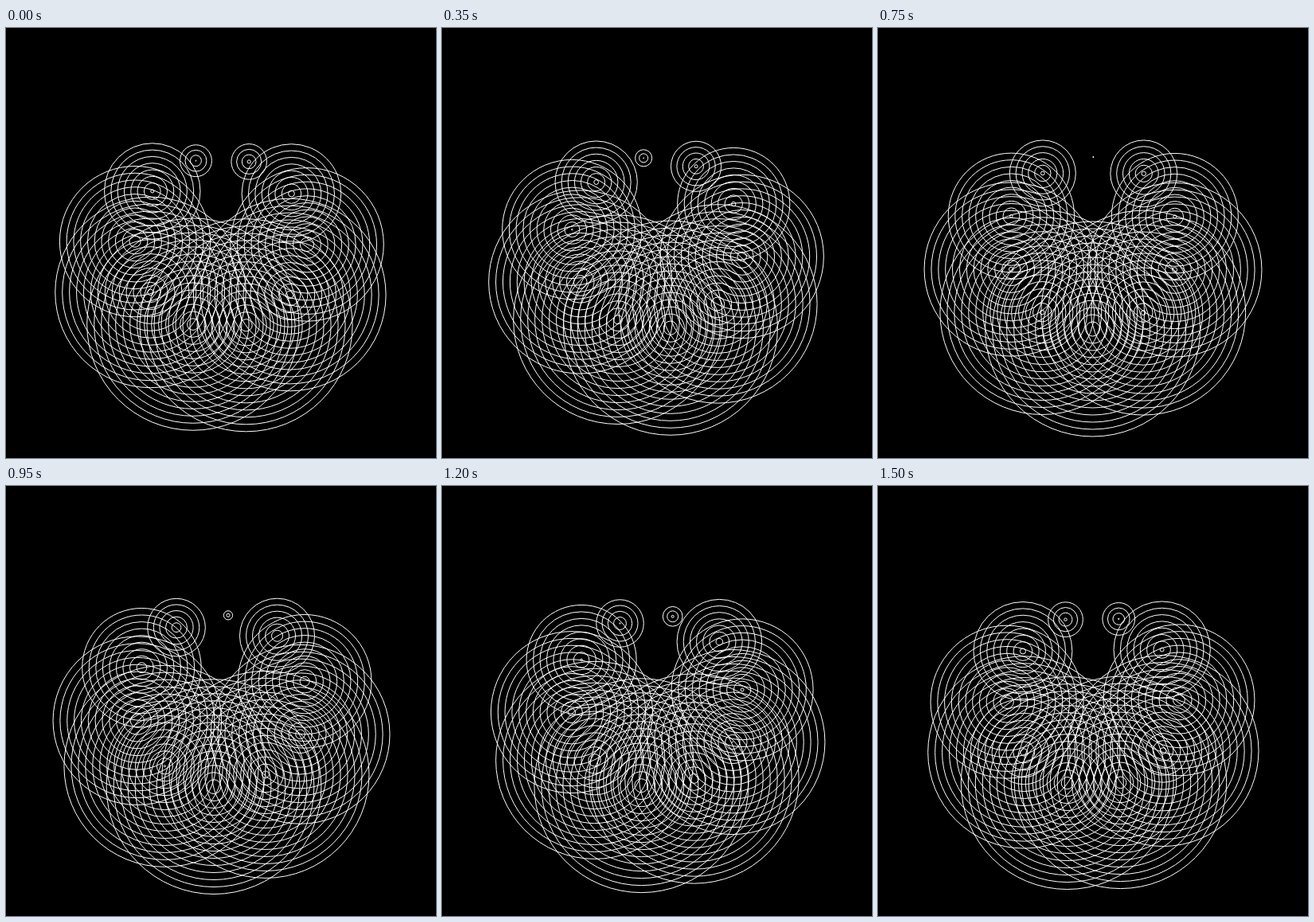
Animation of 540 by 540 pixels, one loop 1550 ms. Source, as an HTML page with a canvas:

```html
<!DOCTYPE html>
<html lang="en">
<head>
<meta charset="utf-8">
<title>Orbiting rings</title>
<style>
  html, body { margin: 0; width: 100%; height: 100%; overflow: hidden; background: #000; }
  canvas { display: block; width: 540px; height: 540px; }
</style>
</head>
<body>
<canvas id="stage" width="540" height="540"></canvas>
<script>
  const ctx = document.getElementById('stage').getContext('2d');
  const TAU = Math.PI * 2;
  const SIZE = 540, MID = SIZE / 2;
  const STEP = 50, STEPS = 31;
  const START = 0.96, SPEED = 0.02; // radians, radians per step
  const GROUPS = 10, ORBIT = SIZE / 5, MAX_R = SIZE / 4, MAX_RINGS = 14;

  function ring(x, y, r) {
    ctx.beginPath();
    ctx.arc(x, y, Math.max(r, 0.5), 0, TAU);
    ctx.stroke();
  }

  // Ring size and count both grow with the distance from the top of the orbit.
  function group(angle) {
    const x = MID + ORBIT * Math.sin(angle);
    const y = MID - ORBIT * Math.cos(angle);
    const size = Math.abs(Math.sin(angle / 2));
    const count = 1 + MAX_RINGS * size;
    for (let k = 0; k < count; k++) {
      ring(x, y, MAX_R * size * (1 - k / count));
    }
  }

  function draw(ms) {
    const turn = START + SPEED * (Math.floor(ms / STEP) % STEPS);
    ctx.fillStyle = '#000';
    ctx.fillRect(0, 0, SIZE, SIZE);
    ctx.strokeStyle = '#fff';
    ctx.lineWidth = 1;
    for (let i = 0; i < GROUPS; i++) group(turn + i / GROUPS * TAU);
  }

  const start = performance.now();
  function tick() {
    draw(performance.now() - start);
    requestAnimationFrame(tick);
  }
  tick();
</script>
</body>
</html>
```
